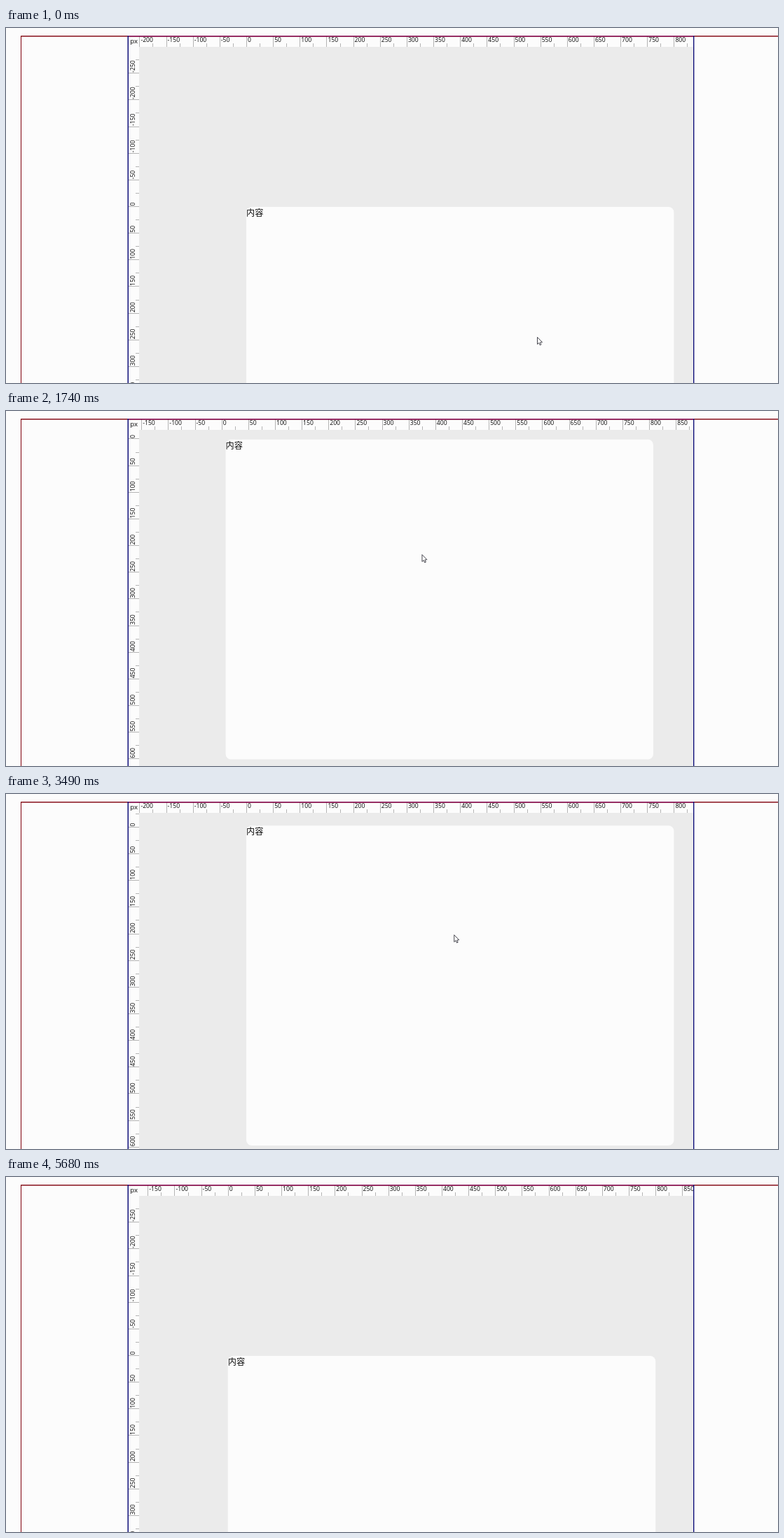
An HTML page with a canvas that plays this animation: 1102 px wide and 508 px high, repeating every 6.4 s.

```html
<!DOCTYPE html>
<html lang="zh">
<head>
<meta charset="utf-8">
<title>Canvas ruler</title>
<style>
  html, body { margin: 0; width: 100%; height: 100%; overflow: hidden; background: #fcfcfc; }
  canvas { display: block; width: 1102px; height: 508px; }
</style>
</head>
<body>
<canvas id="stage" width="1102" height="508"></canvas>
<script>
const ctx = document.getElementById('stage').getContext('2d');
const W = 1102, H = 508, LOOP = 6400, STEP = 40.625;
const SCALE = 0.763;
const LEFT = 174, TOP = 11, RIGHT = 981, EDGE_X = 190, EDGE_Y = 27;
const MAX_X = 343, MAX_Y = 256;
const GRAB_X = -260, GRAB_Y = -163;
const BOARD_LAG = 40, RULER_LAG = 53, RELEASE = 5510, HIDE = 5670;
const PAPER = '#fcfcfc', GREY = '#ebebeb', TICK = '#b4b4b4', INK = '#0c0c0c';
const LATIN = '"Open Sans", "Noto Sans", sans-serif';

// Pointer turns: time (ms), x, y, and velocity in px/s where it is moving
const turns = [
  [0, 758, 442],
  [200, 603, 419],
  [350, 603, 419],
  [1050, 477, 252, 45, -20],
  [1740, 593, 205, 530, 50],
  [2350, 570, 430, -150, 100],
  [3000, 719, 383, 550, -440],
  [3570, 603, 195, -400, 0],
  [3970, 451, 210, 30, 0],
  [4910, 538, 356, 175, 275],
  [5550, 579, 470, 62, 0],
  [5640, 750, 420]
];

function hermite(u, p, q, m, n) {
  const u2 = u * u, u3 = u2 * u, s = 3 * u2 - 2 * u3;
  return p + (q - p) * s + m * (u3 - 2 * u2 + u) + n * (u3 - u2);
}

function pointerAt(t) {
  const end = turns[turns.length - 1];
  t = Math.max(0, Math.min(t, end[0]));
  const i = Math.max(1, turns.findIndex(k => k[0] >= t));
  const [t0, x0, y0, vx0 = 0, vy0 = 0] = turns[i - 1];
  const [t1, x1, y1, vx1 = 0, vy1 = 0] = turns[i];
  const u = (t - t0) / (t1 - t0), d = (t1 - t0) / 1000;
  return {
    x: hermite(u, x0, x1, vx0 * d, vx1 * d),
    y: hermite(u, y0, y1, vy0 * d, vy1 * d)
  };
}

function panAt(t) {
  const p = pointerAt(Math.min(t, RELEASE));
  return { x: Math.min(MAX_X, p.x + GRAB_X), y: Math.min(MAX_Y, p.y + GRAB_Y) };
}

function rect(color, x, y, w, h) {
  ctx.fillStyle = color;
  ctx.fillRect(x, y, w, h);
}

function text(str, x, y, font) {
  ctx.fillStyle = INK;
  ctx.font = font;
  ctx.fillText(str, x, y);
}

function clipped(x, y, w, h, draw) {
  ctx.save();
  ctx.beginPath();
  ctx.rect(x, y, w, h);
  ctx.clip();
  draw();
  ctx.restore();
}

function drawBoard(p) {
  clipped(EDGE_X, EDGE_Y, RIGHT - EDGE_X, H - EDGE_Y, () => {
    rect(GREY, EDGE_X, EDGE_Y, W, H);
    ctx.fillStyle = PAPER;
    ctx.beginPath();
    ctx.roundRect(p.x, p.y, 800 * SCALE, 600 * SCALE, 10 * SCALE);
    ctx.fill();
    text('内容', p.x, p.y + 13, '12.2px "Noto Sans CJK SC", "Noto Sans CJK", sans-serif');
  });
}

function eachMark(origin, end, draw) {
  const gap = 25 * SCALE;
  for (let n = Math.floor(-origin / gap); origin + n * gap < end + 30; n++) {
    draw(origin + n * gap, n * 25, n % 2 === 0);
  }
}

function drawRulers(p) {
  const font = '8.6px ' + LATIN;
  clipped(EDGE_X, TOP, RIGHT - EDGE_X, EDGE_Y - TOP, () => {
    eachMark(p.x, RIGHT, (x, value, major) => {
      rect(TICK, Math.round(x), major ? 12 : 22, 1, major ? 15 : 5);
      if (major) text(value, x + 2, 20, font);
    });
  });
  clipped(LEFT, EDGE_Y, EDGE_X - LEFT, H - EDGE_Y, () => {
    eachMark(p.y, H, (y, value, major) => {
      rect(TICK, major ? 175 : 185, Math.round(y) - 1, major ? 15 : 5, 1);
      if (!major) return;
      ctx.save();
      ctx.translate(183.5, y - 1.5);
      ctx.rotate(-Math.PI / 2);
      text(value, 0, 0, font);
      ctx.restore();
    });
  });
  text('px', 177.3, 21.5, '9.6px ' + LATIN);
}

function drawBorders() {
  const red = '#80000c', blue = '#10107a';
  rect(red, 21, TOP, W, 1.4);
  rect(red, 21, TOP, 1, H);
  rect('#80004c', LEFT, TOP, RIGHT - LEFT, 1.4);
  rect(blue, 173.5, TOP, 1.5, H);
  rect(blue, RIGHT, TOP, 1.4, H);
}

function drawPointer({ x, y }) {
  ctx.save();
  ctx.translate(x + 0.5, y + 0.5);
  const arrow = new Path2D('M0 0V10L2.3 8L3.7 11.3L5.4 10.6L4 7.4L7 7.2Z');
  ctx.fillStyle = '#fff';
  ctx.fill(arrow);
  ctx.strokeStyle = '#33333c';
  ctx.lineWidth = 0.9;
  ctx.stroke(arrow);
  ctx.restore();
}

function render(now) {
  const time = now % LOOP;
  const pose = Math.floor((time + 12) / STEP) * STEP - 6;
  rect(PAPER, 0, 0, W, H);
  drawBoard(panAt(pose - BOARD_LAG));
  drawRulers(panAt(pose - RULER_LAG));
  drawBorders();
  if (pose < HIDE) drawPointer(pointerAt(pose));
}

let start;
function tick(now) {
  if (start === undefined) start = now;
  render(now - start);
  requestAnimationFrame(tick);
}
render(0);
requestAnimationFrame(tick);
</script>
</body>
</html>
```
